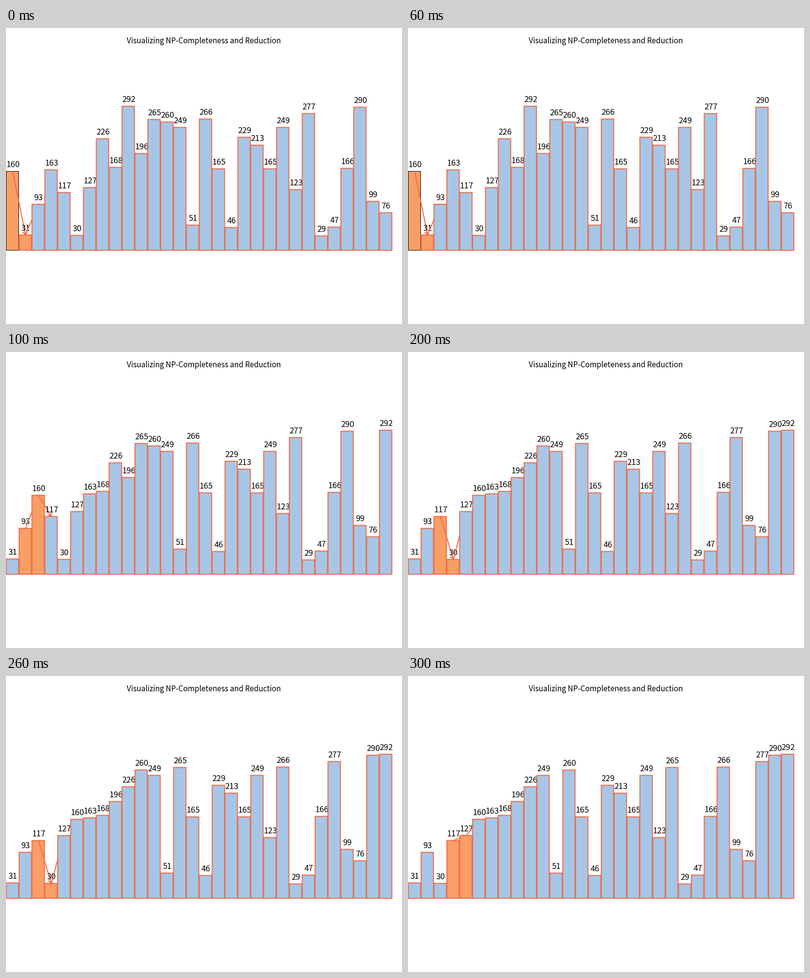
These frames come from a looping animation (800 by 600 pixels, 0.4 s). A matplotlib script:

```python
import matplotlib.pyplot as plt
from matplotlib.animation import FuncAnimation
from matplotlib.patches import Rectangle
import numpy as np

W, H, DPI = 800, 600, 100
PX = 72 / DPI
STEP, BAR, BASE = 26, 25, 450
HALF = 0.5  # strokes are centred on pixel middles
BLUE, ORANGE, CORAL = "#a7c6e6", "#f99e64", "#f06a4a"
FONT = "Noto Sans CJK JP"
PASSES = 4

START = [160, 31, 93, 163, 117, 30, 127, 226, 168, 292,
         196, 265, 260, 249, 51, 266, 165, 46, 229, 213,
         165, 249, 123, 277, 29, 47, 166, 290, 99, 76]

fig = plt.figure(figsize=(W / DPI, H / DPI), dpi=DPI, facecolor="white")
ax = fig.add_axes([0, 0, 1, 1])
ax.set_xlim(0, W)
ax.set_ylim(H, 0)
ax.axis("off")
ax.text(399.5, 31, "Visualizing NP-Completeness and Reduction", family=FONT,
        fontsize=15.15 * PX, ha="center", va="baseline")

drawn = []


def bubble(values, passes):
    """Values after the given number of bubble sort passes."""
    out = list(values)
    for _ in range(passes):
        for j in range(len(out) - 1):
            if out[j] > out[j + 1]:
                out[j], out[j + 1] = out[j + 1], out[j]
    return out


def top(values, i):
    return STEP * i + STEP / 2 + HALF, BASE - values[i] + HALF


def bar(i, value, fill, first):
    # the first bar of a run still has the thin default outline
    width, edge = (1, "black") if first else (2, CORAL)
    drawn.append(ax.add_patch(Rectangle(
        (STEP * i + HALF, BASE - value + HALF), BAR, value, fc=fill, ec=edge,
        lw=width * PX, joinstyle="miter", snap=False, zorder=10 + i)))


def label(i, value):
    drawn.append(ax.text(
        STEP * i + STEP / 2 + 0.8, BASE - value - 8, str(value), family=FONT,
        fontsize=16.4 * PX, ha="center", va="baseline", zorder=10.3 + i))


def arrow(i, start, end, head=8):
    (x0, y0), (x1, y1) = start, end
    angle = np.arctan2(y1 - y0, x1 - x0)
    ends = [(x0, y0)] + [(x1 - head * np.cos(angle + s * np.pi / 6),
                          y1 - head * np.sin(angle + s * np.pi / 6))
                         for s in (-1, 1)]
    for x, y in ends:
        drawn.extend(ax.plot([x, x1], [y, y1], color=CORAL, lw=2 * PX,
                             solid_capstyle="round", snap=False,
                             scalex=False, scaley=False, zorder=10.6 + i))


def draw(step):
    while drawn:
        drawn.pop().remove()
    values = bubble(START, step)
    for i, value in enumerate(values):
        active = i in (step, step + 1)
        bar(i, value, ORANGE if active else BLUE, step == 0 and i == 0)
        label(i, value)
        if active:
            arrow(i, top(values, i), top(values, i + 1))
    return drawn


anim = FuncAnimation(fig, draw, frames=PASSES, interval=100, repeat=True,
                     repeat_delay=0, init_func=lambda: draw(0))
plt.show()
```
